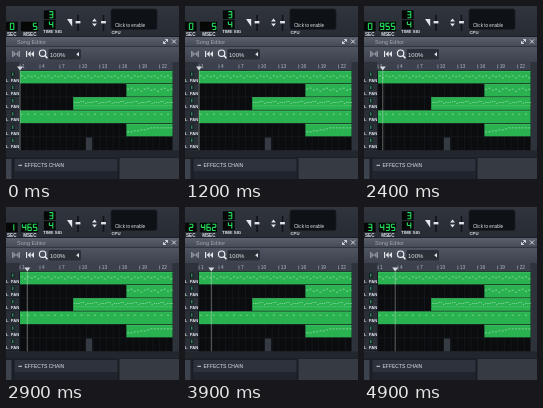
Animation of 173 by 173 pixels, one loop 5000 ms. Source, as an HTML page:

```html
<!DOCTYPE html>
<html lang="en">
<head>
<meta charset="utf-8">
<title>Song Editor</title>
<style>
  html, body { margin: 0; width: 100%; height: 100%; overflow: hidden; background: #22262d; }
  svg { display: block; width: 100vw; height: 100vh; }
  text { font-family: "Liberation Sans", Arial, sans-serif; fill: #dfe3ea; }
  .cap { font-size: 4.6px; font-weight: bold; }
  .pan { font-size: 4.1px; font-weight: bold; }
  .bar { font-size: 4.8px; fill: #b4bac5; }
  .lcd { fill: none; stroke: #22e05c; stroke-width: 1.1; }
</style>
</head>
<body>
<svg viewBox="0 0 173 173" preserveAspectRatio="none">
  <defs>
    <linearGradient id="top" x2="0" y2="1">
      <stop stop-color="#30353e"/><stop offset="1" stop-color="#272b33"/>
    </linearGradient>
    <linearGradient id="title" x2="0" y2="1">
      <stop stop-color="#5c616f"/><stop offset="1" stop-color="#444955"/>
    </linearGradient>
    <linearGradient id="tools" x2="0" y2="1">
      <stop stop-color="#505562"/><stop offset="1" stop-color="#3d424e"/>
    </linearGradient>
  </defs>

  <!-- transport bar -->
  <rect width="173" height="31" fill="url(#top)"/>
  <g fill="#050807" stroke="#363b44" stroke-width=".5">
    <rect x="-1" y="15.2" width="13" height="10.3"/>
    <rect x="14.5" y="15.2" width="18" height="10.3"/>
    <rect x="37.5" y="4" width="12.5" height="9.5"/>
    <rect x="37.5" y="13.8" width="12.5" height="9.5"/>
  </g>
  <path id="sec" class="lcd"/>
  <path id="msec" class="lcd"/>
  <path id="beats" class="lcd"/>
  <path id="unit" class="lcd"/>
  <text class="cap" x="1" y="29.6">SEC</text>
  <text class="cap" x="17.2" y="29.6">MSEC</text>
  <text class="cap" x="37" y="27.4" style="font-size:4.4px">TIME SIG</text>

  <!-- volume and pitch sliders -->
  <path d="M61 13h5.2v7.5z" fill="#e3e6eb"/>
  <path d="M88.5 12.5l2.4 3h-4.8zM88.5 20.5l2.4-3h-4.8z" fill="#e3e6eb"/>
  <g id="faders"></g>

  <rect x="105" y="3" width="46" height="20.5" rx="2" fill="#0e1116" stroke="#1b1f25" stroke-width=".8"/>
  <text x="109" y="20.8" style="font-size:4.6px">Click to enable</text>
  <text class="cap" x="105.5" y="27.6" style="font-size:4.3px">CPU</text>

  <!-- window title and tools -->
  <rect y="30.5" width="173" height="10" fill="url(#title)"/>
  <path d="M0 30.5H173" stroke="#1b1e24"/>
  <text x="11" y="37.8" style="font-size:5.6px;fill:#a3a8b3">Song Editor</text>
  <g stroke="#dfe3ea" stroke-width=".9" fill="none">
    <path d="M157.5 37.5l4-4M159.2 33.5h2.3v2.3M157.5 35.2v2.3h2.3M166 33.5l4 4m0-4l-4 4"/>
  </g>
  <rect y="40.5" width="173" height="15.5" fill="url(#tools)"/>
  <path d="M0 40.5H173" stroke="#2e323b" stroke-width=".8"/>
  <path d="M6 45h1v6H6zM7.3 45l2.7 3-2.7 3zM13 45h1v6h-1zM12.7 45l-2.7 3 2.7 3z" fill="#8d939f"/>
  <path d="M20 45h1.2v6H20zM21.7 48l3-3v6zM25 48l3-3v6z" fill="#e3e6eb"/>
  <circle cx="36.6" cy="47.2" r="3.2" fill="none" stroke="#eef1f5" stroke-width="1.2"/>
  <path d="M39 49.6l2.4 2.6" stroke="#eef1f5" stroke-width="1.5"/>
  <rect x="42.5" y="43" width="32.5" height="10.5" rx="1.5" fill="#2b2f38"/>
  <text x="44" y="50.6" style="font-size:6px">100%</text>
  <path d="M73 46v4.6l-2.8-2.3z" fill="#dfe3ea"/>

  <!-- ruler, track heads and arrangement -->
  <rect y="56" width="173" height="92" fill="#2d323b"/>
  <rect x="13.5" y="56" width="153" height="8.5" fill="#3c414d"/>
  <rect x="13.5" y="64.5" width="153" height="80" fill="#0a0c0e"/>
  <g id="ruler"></g>
  <g id="grid" stroke="#1a1d22" stroke-width=".6"></g>
  <g id="heads"></g>
  <g id="clips"></g>
  <rect x="79.8" y="131.5" width="6.4" height="13" fill="#363a42"/>

  <g id="head">
    <path d="M0 64.5V144.5" stroke="#dde8e0" stroke-width=".8" opacity=".5"/>
    <path d="M-3 60.4h6l-3 4.2z" fill="#d5dade"/>
  </g>

  <!-- lower panels -->
  <rect y="144.5" width="173" height="8" fill="#22262d"/>
  <rect y="151.5" width="173" height="22" fill="#1a1e25"/>
  <rect y="153" width="5.5" height="20" fill="#3d434c"/>
  <rect x="8.5" y="153" width="103" height="12.5" fill="#2d323c"/>
  <rect x="8.5" y="165.5" width="103" height="8" fill="#20242c"/>
  <rect x="113.5" y="152" width="60" height="21" fill="#353a43"/>
  <path d="M12.5 159.3h3.5" stroke="#cfd5df" stroke-width="1"/>
  <text x="18.5" y="161.4" style="font-size:5px">EFFECTS CHAIN</text>
</svg>

<script>
const LOOP = 5000, STEP = 100;
const LEFT = 14, BAR = 6.65, BARS = 23, ROW = 13.25, TOP = 64.5;
const $ = id => document.getElementById(id);
const put = (id, html) => { $(id).innerHTML += html; };
const box = (x, y, w, h, fill) =>
  `<rect x="${x}" y="${y}" width="${w}" height="${h}" fill="${fill}"/>`;

// Seven-segment digits: strokes a to g on a 3.4 by 6.2 cell
const W = 3.4, H = 6.2, M = H / 2;
const SEGMENTS = {
  a: [0, 0, W, 0], b: [W, 0, W, M], c: [W, M, W, H], d: [0, H, W, H],
  e: [0, M, 0, H], f: [0, 0, 0, M], g: [0, M, W, M]
};
const DIGITS = ['abcdef', 'bc', 'abged', 'abgcd', 'fgbc', 'afgcd', 'afgedc', 'abc', 'abcdefg', 'abcdfg'];

function lcd(id, value, right, y) {
  const chars = String(value);
  let d = '';
  [...chars].forEach((ch, i) => {
    const x = right - W - (chars.length - 1 - i) * 5.5;
    for (const s of DIGITS[ch]) {
      const [x1, y1, x2, y2] = SEGMENTS[s];
      d += `M${x + x1} ${y + y1}L${x + x2} ${y + y2}`;
    }
  });
  $(id).setAttribute('d', d);
}

function drawFaders() {
  for (const x of [72, 97.5]) {
    put('faders', box(x - .8, 9, 1.6, 16, '#11151a')
      + box(x - 2.4, 15, 4.8, 2.4, '#dfe2e7'));
  }
}

function drawGrid() {
  for (let bar = 0; bar < BARS; bar++) {
    const x = LEFT + bar * BAR;
    put('grid', `<path d="M${x} ${TOP}V144.5"/>`);
    if (bar % 3 === 0) {
      put('ruler', box(x - .3, 58.5, .7, 4, '#9aa0ac')
        + `<text class="bar" x="${x + 2}" y="62.2">${bar + 1}</text>`);
    }
  }
  for (let r = 0; r < 6; r++) {
    const y = TOP + r * ROW;
    put('grid', `<path d="M${LEFT} ${y}H166.5"/>`);
    put('heads', box(0, y, 13, ROW - .7, '#2b3038')
      + box(0, y + ROW - .7, 13.5, .7, '#15191f')
      + box(5, y + 1.2, 3.6, 5.2, '#10211f')
      + box(6.3, y + 2, 1, 3.4, '#4aa87c')
      + `<text class="pan" x="0" y="${y + 11.2}">L</text>`
      + `<text class="pan" x="4.8" y="${y + 11.2}">PAN</text>`);
  }
}

// Each track: row, first bar, notes per bar, note heights cycled in order
const TRACKS = [
  [0, 0, 2, [5, 7, 5, 6]],
  [1, 16, 2, [5, 4, 6, 5, 7]],
  [2, 8, 3, [5, 5, 5, 4, 4, 6]],
  [3, 0, 1, [3.5]],
  [4, 16, 2, [8, 8, 7, 7, 6, 6, 5, 4, 4, 4, 4, 4, 4, 4]]
];

function drawTracks() {
  for (const [row, first, notes, lift] of TRACKS) {
    const y = TOP + row * ROW, x0 = LEFT + first * BAR, w = BAR / notes;
    put('clips', box(x0, y + .4, 166.5 - x0, ROW - .8, '#2ab250')
      + box(x0, y + .4, 166.5 - x0, .6, '#46c268'));
    for (let n = 0; n < (BARS - first) * notes; n++) {
      const x = x0 + n * w + .7;
      put('clips', box(x, y + lift[n % lift.length], Math.min(w * .6, 2), .8, '#92dba6'));
      if (row === 2) put('clips', box(x, y + 8.5, w * .5, .6, '#7ad092'));
    }
  }
}

// The clock advances in whole audio blocks once playback begins
function songTime(t) {
  const blocks = Math.max(0, Math.ceil(.0428125 * (t - 1700) + 10.98));
  return Math.round(5 + blocks * 23.175);
}

function render(now) {
  const t = Math.floor((now % LOOP) / STEP) * STEP;
  const ms = songTime(t);
  lcd('sec', Math.floor(ms / 1000), 7.8, 17.3);
  lcd('msec', ms % 1000, 30.8, 17.3);
  $('head').setAttribute('transform', `translate(${(LEFT + ms * .005).toFixed(2)} 0)`);
}

drawFaders();
drawGrid();
drawTracks();
lcd('beats', 3, 46.8, 5.6);
lcd('unit', 4, 46.8, 15.4);

const start = performance.now();
function loop() {
  render(performance.now() - start);
  requestAnimationFrame(loop);
}
loop();
</script>
</body>
</html>
```
